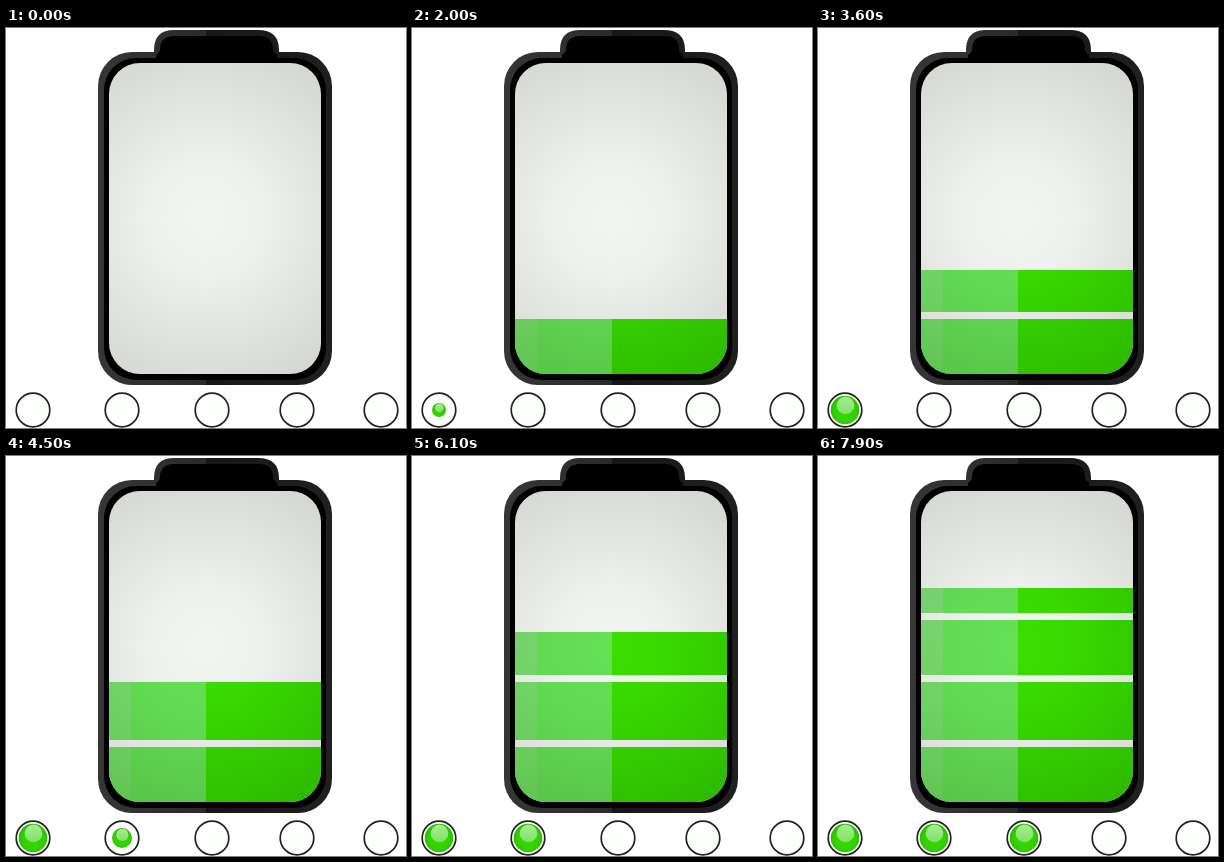
An HTML page for the animation above (8000 ms loop, 400 by 400 pixels).

```html
<!DOCTYPE html>
<html lang="en">
<head>
<meta charset="utf-8">
<title>Charging battery</title>
<style>
  html, body { margin: 0; width: 100%; height: 100%; overflow: hidden; background: #fff; }
  svg { display: block; width: 400px; height: 400px; }
</style>
</head>
<body>
<svg viewBox="0 0 400 400">
  <defs>
    <linearGradient id="shell" gradientUnits="userSpaceOnUse" x1="92" y1="0" x2="326" y2="0">
      <stop offset="0" stop-color="#363636"/>
      <stop offset=".4615" stop-color="#2a2a2a"/>
      <stop offset=".4615" stop-color="#161616"/>
      <stop offset="1" stop-color="#202020"/>
    </linearGradient>
    <radialGradient id="glass" gradientUnits="userSpaceOnUse" cx="200" cy="190" r="185">
      <stop offset="0" stop-color="#f3f5f2"/>
      <stop offset=".3" stop-color="#eff1ee"/>
      <stop offset="1" stop-color="#d4d6d1"/>
    </radialGradient>
    <radialGradient id="green" gradientUnits="userSpaceOnUse" cx="200" cy="190" r="185">
      <stop offset="0" stop-color="#3cdf00"/>
      <stop offset=".3" stop-color="#39d900"/>
      <stop offset="1" stop-color="#2dba00"/>
    </radialGradient>
    <radialGradient id="pale" gradientUnits="userSpaceOnUse" cx="200" cy="190" r="185">
      <stop offset="0" stop-color="#66e156"/>
      <stop offset=".4" stop-color="#62da53"/>
      <stop offset="1" stop-color="#57c248"/>
    </radialGradient>
    <linearGradient id="sheen" gradientUnits="userSpaceOnUse" x1="0" y1="130" x2="0" y2="346">
      <stop offset="0" stop-color="#a4c8a4" stop-opacity=".38"/>
      <stop offset="1" stop-color="#a4c8a4" stop-opacity=".12"/>
    </linearGradient>
    <radialGradient id="bead" cx=".5" cy=".55" r=".5">
      <stop offset="0" stop-color="#38dc00"/>
      <stop offset=".75" stop-color="#32d000"/>
      <stop offset="1" stop-color="#2bbd00"/>
    </radialGradient>
    <linearGradient id="gloss" x1="0" y1="0" x2="0" y2="1">
      <stop offset="0" stop-color="#a6ec92"/>
      <stop offset="1" stop-color="#80e266"/>
    </linearGradient>
    <clipPath id="inside"><rect x="103" y="35" width="212" height="311" rx="31"/></clipPath>
    <clipPath id="level"><path id="bars"/></clipPath>
  </defs>

  <g fill="url(#shell)">
    <rect x="92" y="24" width="234" height="333" rx="34"/>
    <path d="M148 30V22Q148 2 168 2H252Q273 2 273 22V30Z"/>
  </g>
  <path d="M150 32V27Q154 24 154 22Q154 8 168 8H253Q267 8 267 22Q267 24 271 27V32Z"/>
  <rect x="98" y="30" width="222" height="322" rx="32"/>
  <g clip-path="url(#inside)">
    <rect x="103" y="35" width="212" height="311" fill="url(#glass)"/>
    <g clip-path="url(#level)">
      <rect x="103" y="35" width="212" height="311" fill="url(#green)"/>
      <rect x="103" y="35" width="97" height="311" fill="url(#pale)"/>
      <rect x="103" y="35" width="22" height="311" fill="url(#sheen)"/>
    </g>
  </g>
  <g id="lamps"></g>
</svg>
<script>
  const LOOP = 8000, STEP = 100;
  const lampX = [27, 116, 206, 291, 375];
  // Each bar rises from its base to its top between two times.
  const barList = [
    { base: 346, top: 291, from: 0, to: 1700 },
    { base: 284, top: 226, from: 2380, to: 4100 },
    { base: 219, top: 164, from: 4750, to: 6500 },
    { base: 157, top: 100, from: 7150, to: 8900 }
  ];
  const lampStart = i => 1800 + 2400 * i;
  const part = (t, from, to) => Math.min(1, Math.max(0, (t - from) / (to - from)));

  document.getElementById('lamps').innerHTML = lampX.map(x => `
    <g transform="translate(${x} 382)">
      <circle r="16.8" fill="#fdfffd" stroke="#222" stroke-width="1.7"/>
      <g class="bead">
        <circle r="14.3" fill="url(#bead)"/>
        <circle cx=".5" cy="-4.6" r="8.8" fill="url(#gloss)"/>
      </g>
    </g>`).join('');
  const beads = document.querySelectorAll('.bead');
  const bars = document.getElementById('bars');

  function draw(t) {
    bars.setAttribute('d', barList.map(b => {
      const y = Math.floor(b.base + (b.top - b.base) * part(t, b.from, b.to));
      return `M103 ${b.base}V${y}H315V${b.base}Z`;
    }).join(''));
    beads.forEach((bead, i) => {
      const p = part(t, lampStart(i), lampStart(i) + 500);
      const size = 1 - Math.pow(1 - p, 1.3);
      bead.setAttribute('transform', `scale(${size})`);
      bead.setAttribute('visibility', p > 0 ? 'visible' : 'hidden');
    });
  }

  const start = performance.now();
  function tick(now) {
    const t = Math.max(0, now - start) % LOOP;
    draw(Math.floor(t / STEP) * STEP);
    requestAnimationFrame(tick);
  }
  draw(0);
  requestAnimationFrame(tick);
</script>
</body>
</html>
```
